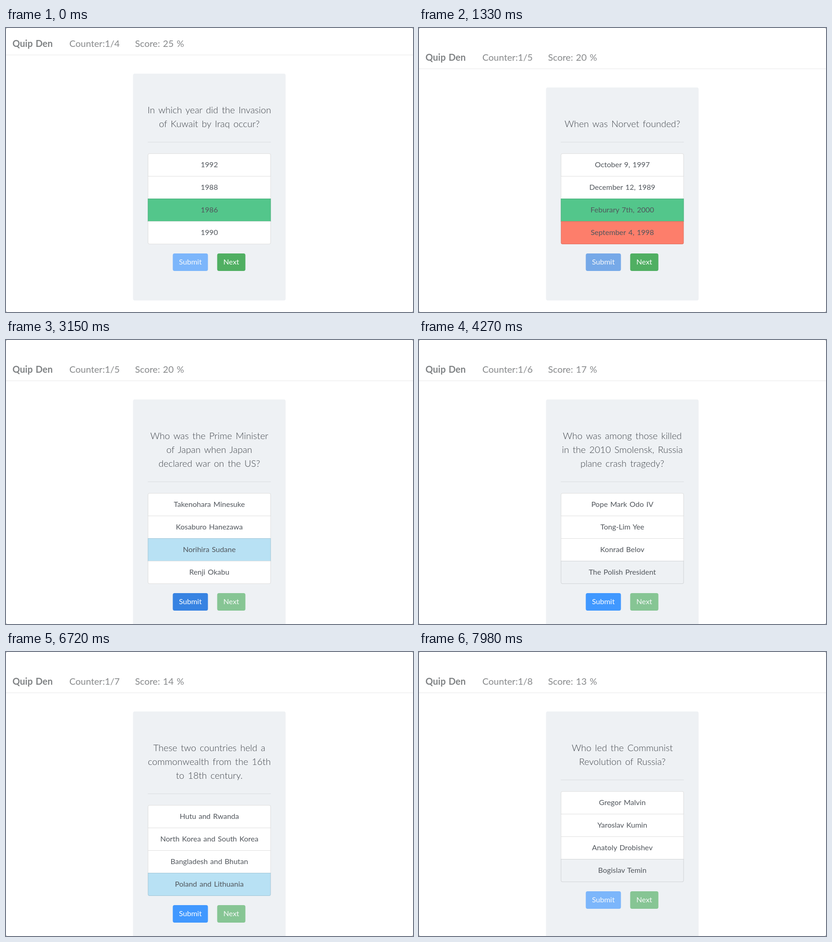
An HTML page that plays this animation: 880 px wide and 616 px high, repeating every 8000 ms.

```html
<!DOCTYPE html>
<html lang="en">
<head>
<meta charset="utf-8">
<title>Quiz</title>
<style>
  html, body { margin: 0; width: 100%; height: 100%; overflow: hidden; background: #999; }
  body { font: 16px/24px Lato, "Open Sans", sans-serif; word-spacing: .08em; color: #51565c; }
  * { box-sizing: border-box; }
  #stage { position: relative; width: 880px; height: 616px; overflow: hidden; background: #fff; border-radius: 3px; }
  #page { position: absolute; inset: 0; }
  nav { height: 89px; border-bottom: 1px solid #e7e8e9; font-size: 20px; line-height: 30px; color: #87898b; }
  nav span { position: absolute; top: 48px; white-space: pre; }
  nav .brand { left: 14px; font-weight: 700; color: #7f8284; }
  #count { left: 137px; }
  #score { left: 279px; }
  #card { position: absolute; left: 275px; top: 129px; width: 330px; padding: 64px 32px; background: #eef1f4; border-radius: 4px; text-align: center; transform: translateX(-.4px); }
  #ask { position: relative; top: -1px; font-size: 20px; font-weight: 300; line-height: 30px; word-spacing: .12em; color: #40454b; white-space: pre; }
  #ask div { display: flex; justify-content: center; }
  hr { margin: 24px 0; border: 0; height: 1px; background: #d9dcdf; }
  .row { height: 50px; margin-bottom: -1px; padding-top: 11px; border: 1px solid rgba(0, 0, 0, .125); white-space: pre; }
  .row:first-child { border-radius: 4px 4px 0 0; }
  .row:last-child { border-radius: 0 0 4px 4px; margin-bottom: 0; }
  #buttons { position: relative; height: 38px; margin-top: 20px; }
  .btn { position: absolute; top: 0; height: 38px; padding-top: 6px; border-radius: 4px; color: #fff; }
  #submit { left: 54px; width: 76px; }
  #next { left: 150px; width: 61px; }
</style>
</head>
<body>
<div id="stage">
  <div id="page">
    <nav><span class="brand">Quip Den</span><span id="count"></span><span id="score"></span></nav>
    <div id="card">
      <div id="ask"></div>
      <hr>
      <div id="list"><div class="row"></div><div class="row"></div><div class="row"></div><div class="row"></div></div>
      <div id="buttons"><div class="btn" id="submit">Submit</div><div class="btn" id="next">Next</div></div>
    </div>
  </div>
</div>
<script>
const LOOP = 8000, STEP = 70, FADE = 150, NEVER = 1e6;
const SUBMIT = [[64, 152, 255], [55, 131, 226]];
const NEXT = [[80, 175, 98], [68, 152, 83]];
const FILL = { plain: '#fff', hover: '#eef1f4', picked: '#b8e1f4', right: '#53c68b', wrong: '#fd7e6b' };

// Times in ms. over: [from, to, row]; aim: pointer reaches Submit; go: pointer reaches Next.
const quiz = [
  { start: 0, ask: ['In which year did the Invasion', 'of Kuwait by Iraq occur?'],
    rows: ['1992', '1988', '1986', '1990'],
    over: [], pick: -1, choice: 2, right: 2, aim: -NEVER, send: -NEVER, go: 70 },
  { start: 210, ask: ['When was Norvet founded?'],
    rows: ['October 9, 1997', 'December 12, 1989', 'Feburary 7th, 2000', 'September 4, 1998'],
    over: [[490, 980, 3]], pick: 770, choice: 3, right: 2, aim: 1050, send: 1330, go: 1610 },
  { start: 1820, ask: ['Who was the Prime Minister', 'of Japan when Japan', 'declared war on the US?'],
    rows: ['Takenohara Minesuke', 'Kosaburo Hanezawa', 'Norihira Sudane', 'Renji Okabu'],
    over: [[1820, 2170, 3], [2170, 2660, 2], [2660, 2800, 3]], pick: 2380, choice: 2, right: 3, aim: 2870, send: 3290, go: 3500 },
  { start: 3780, ask: ['Who was among those killed', 'in the 2010 Smolensk, Russia', 'plane crash tragedy?'],
    rows: ['Pope Mark Odo IV', 'Tong-Lim Yee', 'Konrad Belov', 'The Polish President'],
    over: [[3990, 4480, 3]], pick: 4200, choice: 3, right: 2, aim: 4620, send: 5040, go: 5170 },
  { start: 5670, ask: ['These two countries held a', 'commonwealth from the 16th', 'to 18th century.'],
    rows: ['Hutu and Rwanda', 'North Korea and South Korea', 'Bangladesh and Bhutan', 'Poland and Lithuania'],
    over: [[6020, 6650, 3]], pick: 6370, choice: 3, right: 2, aim: 6790, send: 7210, go: 7490 },
  { start: 7700, ask: ['Who led the Communist', 'Revolution of Russia?'],
    rows: ['Gregor Malvin', 'Yaroslav Kumin', 'Anatoly Drobishev', 'Bogislav Temin'],
    over: [[7980, NEVER, 3]], pick: NEVER, choice: -1, right: -1, aim: NEVER, send: NEVER, go: NEVER }
];

const $ = id => document.getElementById(id);
const rowEls = [...document.querySelectorAll('.row')];
let shown = -1;

const ease = p => { p = Math.min(1, Math.max(0, p)); return 1 - (1 - p) * (1 - p) * (1 + p / 2); };
const glow = (t, from, to) => t < to ? ease((t - from) / FADE) : 1 - ease((t - to) / FADE);
const mix = ([a, b], k) => `rgb(${a.map((v, i) => Math.round(v + (b[i] - v) * k))})`;

function show(index) {
  const q = quiz[index];
  $('ask').replaceChildren(...q.ask.map(line => {
    const div = document.createElement('div');
    div.textContent = line;
    return div;
  }));
  rowEls.forEach((el, i) => el.textContent = q.rows[i]);
  $('page').style.top = index ? '0' : '-30px';
  shown = index;
}

function rowState(q, i, t) {
  if (t >= q.send) return i === q.right ? 'right' : i === q.choice ? 'wrong' : 'plain';
  if (q.over.some(([from, to, row]) => row === i && t >= from && t < to)) return 'hover';
  return t >= q.pick && i === q.choice ? 'picked' : 'plain';
}

function paintButton(id, colours, k, on) {
  const s = $(id).style;
  s.background = mix(colours, k);
  s.opacity = on ? 1 : .65;
}

function draw(t) {
  const index = quiz.findLastIndex(q => t >= q.start);
  const q = quiz[index], prev = quiz[index - 1];
  if (index !== shown) show(index);

  const sent = t >= q.send;
  const total = 3 + index + (sent ? 1 : 0);
  $('count').textContent = `Counter:1/${total}`;
  $('score').textContent = `Score: ${Math.round(100 / total)} %`;
  rowEls.forEach((el, i) => el.style.background = FILL[rowState(q, i, t)]);

  paintButton('submit', SUBMIT, glow(t, q.aim, q.send), t >= q.pick && !sent);
  const leaving = prev ? glow(t, prev.go, q.start) : 0;
  paintButton('next', NEXT, Math.max(leaving, glow(t, q.go, NEVER)), sent);
}

const begin = performance.now();
function tick() {
  const t = (performance.now() - begin) % LOOP;
  draw(Math.floor(t / STEP) * STEP);
  requestAnimationFrame(tick);
}
tick();
</script>
</body>
</html>
```
